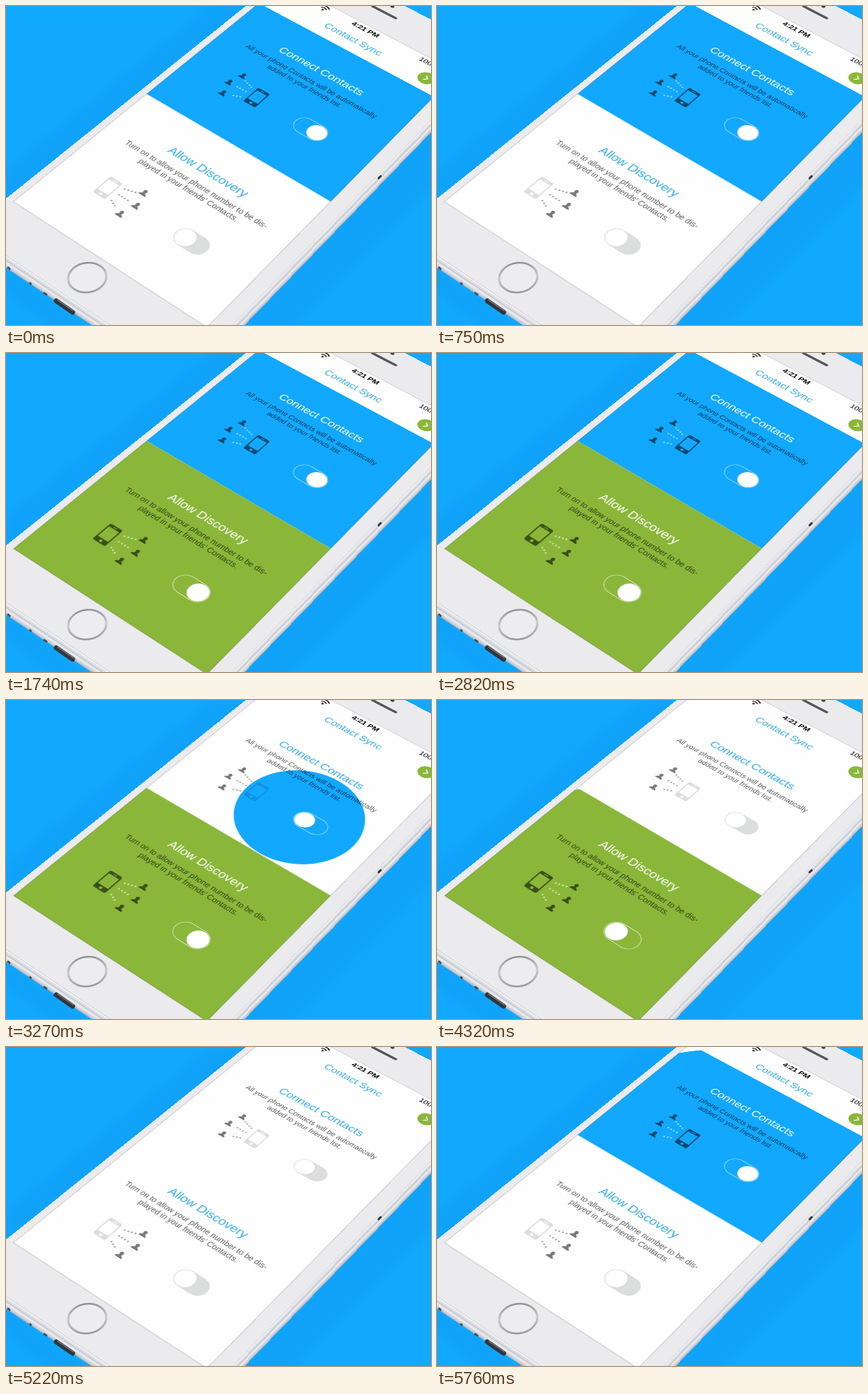
An HTML page that plays this animation: 600x450 px, repeating every 5790 ms.

```html
<!DOCTYPE html>
<html lang="en">
<head>
<meta charset="utf-8">
<title>Contact Sync</title>
<style>
  html, body { margin: 0; width: 100%; height: 100%; overflow: hidden; background: #11a8ff; }
  #stage { position: relative; width: 600px; height: 450px; overflow: hidden; background: #11a8ff; }
  #stage > * { position: absolute; left: 0; top: 0; }
  #stage > .slab { left: -13px; top: -166px; width: 414px; height: 851px; border-radius: 56px; transform-origin: 13px 166px; }
  #screen { overflow: visible; transform-origin: 0 0; }
  text { font: 13.8px "Liberation Sans", Arial, sans-serif; text-anchor: middle; }
  .title { font-size: 22px; }
  .status { font-weight: bold; font-size: 15px; }
</style>
</head>
<body>
<div id="stage">
  <svg width="600" height="450">
    <g fill="#0a8fe2" opacity=".22" style="filter: blur(5px)">
      <path d="M350 0 0 280V232L290 0Z"/>
      <path d="M610 165 325 460H395L610 245Z"/>
      <path d="M-10 360V395L75 460H120Z"/>
    </g>
  </svg>

  <svg id="screen" width="375" height="605">
    <defs>
      <linearGradient id="ring" x2="1" y2="1">
        <stop stop-color="#6f7176"/><stop offset=".5" stop-color="#c9cacd"/><stop offset="1" stop-color="#7d7f84"/>
      </linearGradient>
    </defs>
    <path d="M162 -127h50" stroke="#54575d" stroke-width="6" stroke-linecap="round"/>
    <circle cx="190" cy="-150" r="3.500" fill="#3c3f45"/>
    <circle cx="184" cy="643" r="27" fill="#ededf0" stroke="url(#ring)" stroke-width="3"/>
    <rect y="-78" width="375" height="683" fill="#fefefe"/>
    <g fill="none" stroke="#222" stroke-width="2.4">
      <path d="M89 -68a12 12 0 0 1 18 0M92.500 -64a7.500 7.500 0 0 1 11 0"/>
      <circle cx="98" cy="-60" r="1"/>
    </g>
    <text class="status" x="188" y="-61">4:21 PM</text>
    <text class="status" x="304" y="-61" style="text-anchor: start; font-weight: normal">100%</text>
    <text class="title" x="185.500" y="-24.500" fill="#35aeea" style="font-size: 20.3px">Contact Sync</text>
    <circle cx="340" cy="-30" r="15" fill="#8ab739"/>
    <path d="M337 -36l6 6-6 6" fill="none" stroke="#fff" stroke-width="2"/>
  </svg>

  <svg width="600" height="450" fill="none" stroke-linecap="round">
    <path d="M71 416 94 432" stroke="#33363c" stroke-width="7"/>
    <path d="M73 415 95 430" stroke="#777a80" stroke-width="1.500"/>
    <path d="M54 405l3 2M34 391l1 1M3 369l2 2" stroke="#4b4e55" stroke-width="3"/>
    <path d="M526 243l3-3" stroke="#30343b" stroke-width="3"/>
  </svg>
</div>

<script>
const LOOP = 5790, PANEL_HEIGHT = 302.5;
const PLANE = "matrix3d(.5733,.3339,0,-.0001413, -.5753,.391,0,-.0002604, 0,0,1,0, 357,-4,0,1)";
const OFF_TITLE = [53, 174, 234];
const screen = document.getElementById("screen");
screen.style.transform = PLANE;

// The body is a stack of slabs, lowest first; each one shows as a stripe on the near sides.
const slabs = [[18, "#b6b9c0"], [16, "#d0d3d9"], [13, "#e6e8ec"], [9, "#cbced4"],
               [6, "#dfe1e5"], [3, "#f3f3f5"], [1, "#cfd1d6"], [0, "#ebebee"]];
for (const [drop, color] of slabs) {
  const slab = document.createElement("div");
  slab.className = "slab";
  slab.style.background = color;
  slab.style.transform = `translate(0, ${drop}px) ${PLANE}`;
  screen.before(slab);
}

const person = (x, y) =>
  `<path transform="translate(${x} ${y}) scale(.84)" d="M0-8a4 4.500 0 0 1 2.500 8c0 2 5 2 5.500 7h-16c.5-5 5.500-5 5.500-7a4 4.500 0 0 1 2.500-8z"/>`;

function icons(x, side) {
  const people = [[50, -27], [58, 0], [50, 27]].map(([dx, dy]) => person(dx * side, dy)).join("");
  return `<g transform="translate(${x} 193.500)">
    <path class="phone" transform="scale(.89)" fill-rule="evenodd" d="M-10-23h20a4 4 0 0 1 4 4v38a4 4 0 0 1-4 4h-20a4 4 0 0 1-4-4v-38a4 4 0 0 1 4-4z
      M-11.500-16v28h23v-28zM-3 17.500a3 3 0 0 0 6 0a3 3 0 0 0-6 0zM-4-20v1.500h8v-1.500z"/>
    <g class="people">${people}</g>
    <path class="dots" transform="scale(${side} 1)" d="M22-14 41-20M23 0H43M22 16 38 23"
      fill="none" stroke-width="3.200" stroke-linecap="round" stroke-dasharray="0 6"/>
  </g>`;
}

function addPanel({ top, color, centre, shift, title, lines, icon, side, on, off }) {
  screen.insertAdjacentHTML("beforeend", `<svg y="${top}" width="375" height="${PANEL_HEIGHT}">
    <rect x="228" y="177.500" width="60" height="36" rx="18" fill="#dcdddd"/>
    <circle class="ripple" cx="${centre}" cy="193" fill="${color}"/>
    <g transform="translate(${shift} 0)">
      <text class="title" x="187.500" y="79">${title}</text>
      <text x="187.500" y="108" fill-opacity=".64">${lines[0]}</text>
      <text x="187.500" y="125" fill-opacity=".64">${lines[1]}</text>
    </g>
    ${icons(icon, side)}
    <rect x="227.500" y="177" width="61" height="37" rx="18.500" fill="none" stroke="#fff" stroke-opacity=".75"/>
    <circle class="knob" cy="195.500" r="17.200" fill="#fff" stroke="#000" stroke-opacity=".1"/>
  </svg>`);
  const root = screen.lastElementChild;
  const find = name => root.querySelector("." + name);
  return { on, off, ripple: find("ripple"), title: find("title"), phone: find("phone"),
           people: find("people"), dots: find("dots"), knob: find("knob") };
}

const panels = [
  addPanel({ top: 0, color: "#12a8ff", centre: 234, shift: 2, title: "Connect Contacts",
    lines: ["All your phone Contacts will be automatically", "added to your friends list."],
    icon: 145, side: -1, on: 5220, off: 2820 }),
  addPanel({ top: PANEL_HEIGHT, color: "#8ab739", centre: 246, shift: 0, title: "Allow Discovery",
    lines: ["Turn on to allow your phone number to be dis-", "played in your friends’ Contacts."],
    icon: 90, side: 1, on: 885, off: 4140 })
];
screen.insertAdjacentHTML("beforeend",
  `<rect y="-78" width="375" height="683" fill="none" stroke="#000" stroke-opacity=".22"/>`);

const mix = (from, to, k) => from + (to - from) * k;
const smooth = k => k * k * (3 - 2 * k);

function drawPanel(p, time) {
  const since = start => (time - start + LOOP) % LOOP;
  const opening = since(p.on) < since(p.off);
  const age = Math.min(since(p.on), since(p.off));
  const level = (start, length) => {
    const k = Math.max(0, Math.min(1, (age - start) / length));
    return opening ? k : 1 - k;
  };
  const tint = opening ? level(160, 120) : level(200, 160);
  const dark = opening ? level(330, 190) : level(200, 200);

  p.knob.setAttribute("cx", mix(246, 270.5, smooth(level(0, 160))));
  p.ripple.setAttribute("r", 325 * level(160, 436));
  p.title.setAttribute("fill", `rgb(${OFF_TITLE.map(c => mix(c, 255, tint))})`);
  p.phone.setAttribute("fill-opacity", mix(.13, .57, dark));
  p.people.setAttribute("fill-opacity", mix(.52, .58, tint));
  const grey = mix(150, 255, dark);
  p.dots.setAttribute("stroke", `rgba(${grey},${grey},${grey},${mix(.9, .6, dark)})`);
}

function frame() {
  const time = performance.now() % LOOP;
  panels.forEach(p => drawPanel(p, time));
  requestAnimationFrame(frame);
}
frame();
</script>
</body>
</html>
```
